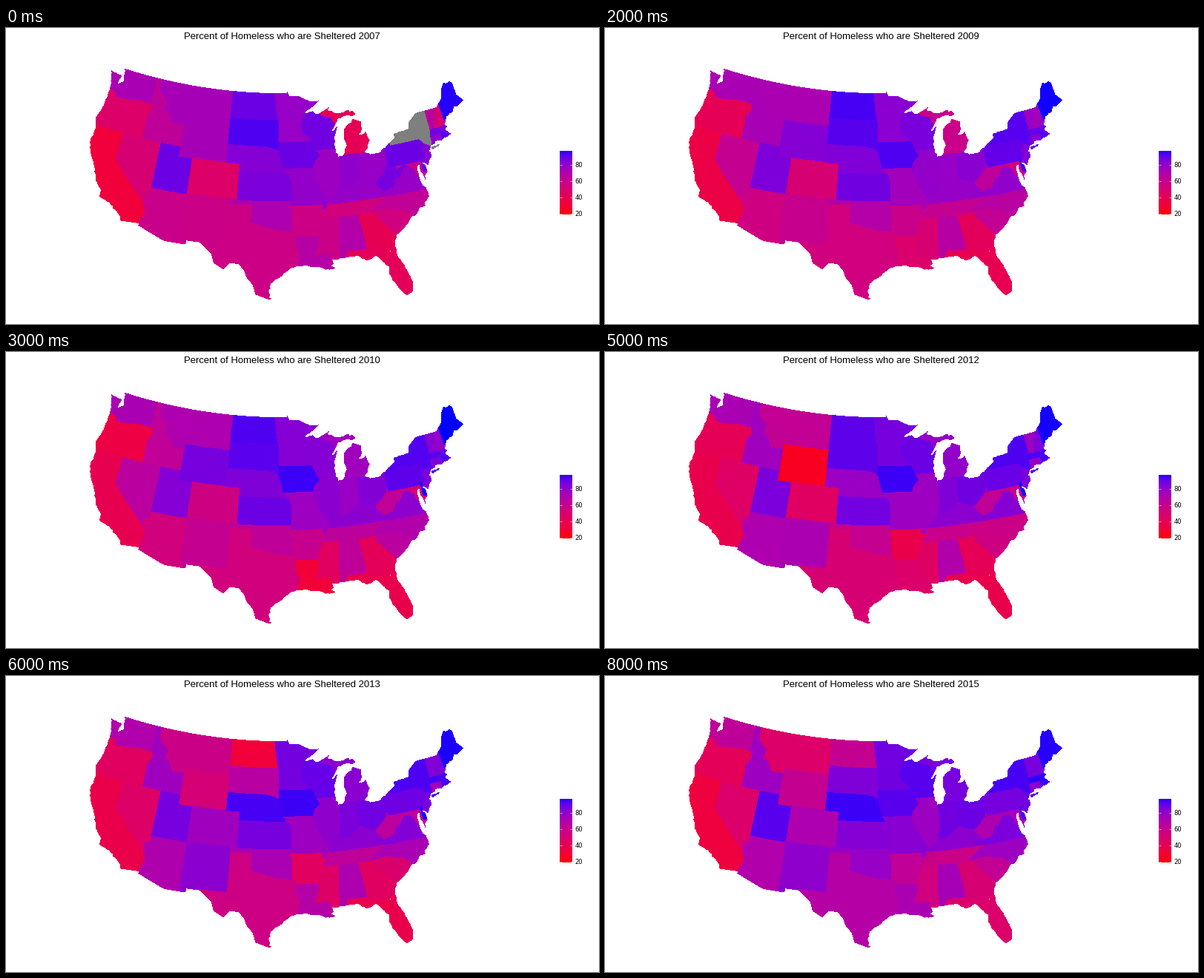
Recreate the animation shown at these times as a matplotlib script. Size 800 by 400 pixels, loop 9 s.

```python
import numpy as np
import matplotlib.pyplot as plt
from matplotlib.animation import FuncAnimation
from matplotlib.patches import PathPatch, Polygon
from matplotlib.path import Path

W, H, DPI = 800, 400, 100
YEARS = range(2007, 2016)
LOW, HIGH = 18.2, 96.5
PT = 72 / DPI

fig = plt.figure(figsize=(W / DPI, H / DPI), dpi=DPI, facecolor="white")
ax = fig.add_axes([0, 0, 1, 1])
ax.axis("off")
rng = np.random.default_rng(4)

# Albers projection with parallels 39 and 45, in pixels
RADIUS, MID_LON, X0, Y49 = 698.8, 95.84, 372.8, 87.7
P1, P2 = np.radians([39, 45])
CONE = (np.sin(P1) + np.sin(P2)) / 2
K = np.cos(P1) ** 2 + 2 * CONE * np.sin(P1)


def rho(lat):
    return RADIUS * np.sqrt(K - 2 * CONE * np.sin(np.radians(lat))) / CONE


def project(west, lat):
    angle = np.radians(MID_LON - west) * CONE
    r = rho(lat)
    return np.column_stack([X0 + r * np.sin(angle),
                            Y49 + r * np.cos(angle) - rho(49)])


def trace(line, rough=0.0):
    """Subdivide a list of west longitudes and latitudes, then project it."""
    pts = np.reshape(line, (-1, 2))
    parts = [pts[:1]]
    for a, b in zip(pts, pts[1:]):
        n = max(1, int(np.abs(b - a).max() * 4))
        parts.append(a + (b - a) * np.arange(1, n + 1)[:, None] / n)
    xy = project(*np.vstack(parts).T)
    return xy + rng.normal(0, 1, xy.shape) * rough


def ramp(t):
    """Red to blue, blended in CIE Lab."""
    lab = np.array([53.24, 80.09, 67.2]) * (1 - t) + np.array([32.3, 79.19, -107.86]) * t
    fy = (lab[0] + 16) / 116
    f = np.array([fy + lab[1] / 500, fy, fy - lab[2] / 200])
    xyz = np.where(f > 6 / 29, f ** 3, (f - 4 / 29) * 108 / 841) * [0.9505, 1, 1.089]
    rgb = np.array([[3.2406, -1.5372, -0.4986],
                    [-0.9689, 1.8758, 0.0415],
                    [0.0557, -0.2040, 1.0570]]) @ xyz
    rgb = np.clip(rgb, 0, 1)
    return np.where(rgb > 0.0031308, 1.055 * rgb ** (1 / 2.4) - 0.055, 12.92 * rgb)


def shade(rate):
    if np.isnan(rate):
        return "#7f7f7f"
    return ramp(np.clip((rate - LOW) / (HIGH - LOW), 0, 1))


shapes = []


def state(first, last, ring, **turns):
    """Rate runs from first to last; y10=62 bends the line in 2010."""
    keys = {2007: first, **{2000 + int(k[1:]): v for k, v in turns.items()}, 2015: last}
    rates = np.interp(YEARS, list(keys), list(keys.values()))
    patch = Polygon(trace(ring + ring[:2]), lw=0, antialiased=False)
    ax.add_patch(patch)
    shapes.append((patch, [shade(r) for r in rates]))


def box(west, east, south, north):
    return [west, north, east, north, east, south, west, south]


# States run loosely past the coast and under later neighbours.
# Northwest: ID, WA, OR, MT
state(63, 76, box(117.25, 111.05, 42, 49), y08=83, y10=62, y12=75)
state(72, 63, box(125, 117.03, 45.5, 49), y12=72)
state(46, 41, [125, 46.25, 123.5, 46.25, 122.8, 46.1, 122.75, 45.65, 121.2, 45.65, 119, 46,
               116.92, 46, 116.5, 45.5, 117.2, 44.4, 117.03, 43.8, 117.03, 42, 125, 42],
      y08=45, y10=34, y13=43)
state(73, 46, [116.05, 49, 104.05, 49, 104.05, 45, 111.05, 45, 111.05, 44.5, 113, 44.45,
               113.95, 45.7, 114.5, 45.56, 114.35, 46.65, 115.7, 47.45, 116.05, 48],
      y10=70, y13=57)
# Southwest: NV, CA, AZ, UT, WY, CO, TX, NM, OK
state(50, 47, box(120, 114.04, 35, 42), y10=65, y12=45)
state(31, 32, [125, 42, 120, 42, 120, 39, 114.63, 35, 114, 34, 114.5, 32, 125, 32],
      y08=31, y10=38, y13=36)
state(58, 69, [114.04, 37, 109.05, 37, 109.05, 31, 115, 31, 114.72, 32.72, 114.14, 34.3,
               114.63, 35, 114.75, 36.1, 114.04, 36.2], y10=53, y12=70)
state(88, 91, box(114.04, 109.05, 37, 42), y10=83, y13=86)
state(73, 60, box(111.05, 104.05, 41, 45), y08=80, y10=86, y12=24, y13=51)
state(46, 70, box(109.05, 102.05, 37, 41), y08=45, y10=55, y12=44, y13=75)
state(56, 67, box(107, 93.5, 25, 36.5), y10=53, y12=50)
state(57, 80, [109.05, 37, 103, 37, 103.05, 32, 106.62, 32, 106.62, 31, 109.05, 31],
      y10=60, y12=71, y13=81)
state(70, 78, [100, 34.56, 98.1, 34.13, 96.5, 33.8, 94.48, 33.64, 94.43, 35.4, 94.62, 37,
               103, 37, 103, 36.5, 100, 36.5], y08=73, y10=63, y12=60, y13=72)
# Plains and upper lakes: MI, MN, IA, ND, SD, AR, MO, NE, KS, WI
state(40, 86, box(90.5, 82, 41.7, 47.6), y08=41, y10=75)
state(78, 87, [97.5, 49, 96, 49.5, 89, 49.5, 89.4, 47.9, 91.8, 46.8, 92.3, 46, 91, 43.5,
               97.5, 43.5], y12=86)
state(88, 91, [97, 43.5, 91.22, 43.5, 90, 42.3, 90, 40.3, 91.42, 40.38, 91.73, 40.6,
               97, 40.6], y10=94, y13=94)
state(88, 60, [104.05, 49, 97.23, 49, 96.8, 46.6, 96.56, 45.94, 104.05, 45.94],
      y08=94, y12=90, y13=31)
state(92, 84, [104.05, 45.94, 96.56, 45.94, 96.45, 45.3, 96.45, 42.49, 97, 42.7,
               104.05, 42.7], y12=90, y13=66)
state(56, 62, [94.62, 36.5, 89.6, 36.5, 89.6, 33.02, 94.04, 33.02, 94.04, 33.55,
               94.48, 33.64, 94.43, 35.4], y10=59, y12=36, y13=43)
state(79, 82, [95.77, 40.58, 91.73, 40.6, 90.5, 40.2, 89.2, 37, 89.4, 36.5, 89.7, 36,
               90.37, 36, 90.15, 36.5, 94.62, 36.5, 94.62, 39.1, 95.5, 40],
      y08=73, y10=76, y13=76)
state(83, 94, [104.05, 43, 98.5, 43, 97, 42.75, 96.45, 42.49, 95.77, 40.58, 95.3, 40,
               102.05, 40, 102.05, 41, 104.05, 41], y10=84, y12=77, y13=93)
state(85, 83, [102.05, 40, 95.3, 40, 94.9, 39.8, 94.62, 39.1, 94.62, 37, 102.05, 37],
      y10=88, y13=86)
state(87, 91, [92.3, 46.1, 92.1, 46.75, 90.8, 47.1, 90.4, 46.57, 88.1, 45.9, 87.65, 45.1,
               86.8, 45.4, 87.5, 42.5, 90.65, 42.5, 91.22, 43.5, 92.75, 44.75, 92.87, 45.6],
      y08=88, y10=83, y12=88)
# South: LA, MS, AL, NC, GA, FL, SC, TN
state(67, 71, [94.04, 33.02, 91, 33.02, 88.5, 31, 88.5, 28.8, 93.85, 28.8, 93.85, 29.7,
               93.7, 30.5, 93.55, 31.1, 94.04, 31.99], y08=64, y10=30, y12=47, y13=67)
state(57, 54, [88, 35, 90.3, 35, 91.15, 33.4, 91, 32.3, 91.6, 31, 89.73, 31, 89.6, 30.1,
               88, 30.1], y08=56, y10=43, y13=45)
state(68, 73, [88.2, 35, 85, 35, 85, 30, 88.4, 30, 88.47, 31.9], y08=70, y10=63, y12=69)
state(62, 76, box(84.32, 75, 33.5, 36.57), y08=62, y10=69, y12=57, y13=72)
state(39, 50, [85.6, 35, 82.5, 35, 80.5, 32, 80.5, 30.5, 85, 30.5, 85.05, 32.1,
               85.18, 32.87], y08=42, y12=40)
state(41, 47, [87.6, 31, 85, 31, 84.86, 30.7, 82.1, 30.4, 82.05, 30.75, 79, 30.75, 79, 25,
               87.5, 25], y10=37, y13=37)
state(54, 61, [83.1, 35, 82.3, 35.2, 81.05, 35.1, 80.8, 34.82, 79.67, 34.8, 78.55, 33.86,
               78.5, 32, 80.9, 32, 81.4, 32.7, 83.35, 34.7], y10=65, y12=55, y13=48)
state(53, 57, [90.3, 35, 89.5, 36.5, 83.68, 36.6, 81.68, 36.59, 82.9, 35.95, 84.32, 35],
      y10=64, y12=58, y13=63)
# Middle: MD, VA, KY, WV, OH, IN, IL
state(60, 72, box(79.48, 75, 37.9, 39.72), y08=60, y10=49, y13=61)
state(78, 85, [83.68, 36.6, 75, 36.55, 75, 37.95, 76.3, 37.95, 77, 38.3, 77.05, 38.8,
               77.8, 39.4, 78.35, 39.4, 82, 37.54])
state(78, 81, [89.4, 36.5, 89.2, 37.2, 88, 39, 82, 39, 82, 37.54, 83.68, 36.6],
      y08=75, y10=81)
state(86, 70, [80.52, 40.63, 80.52, 39.72, 79.48, 39.72, 79.48, 39.2, 78.2, 39.68,
               77.73, 39.32, 78.35, 39.4, 79.3, 38.42, 79.65, 38.58, 80.3, 37.5, 81.68, 37.2,
               82.6, 38.17, 82.6, 38.42, 81.75, 39, 80.85, 39.75], y08=65, y10=62, y12=62)
state(78, 88, [84.82, 41.7, 83.4, 41.73, 83, 42, 80.52, 42.2, 80.52, 40.63, 80.85, 39.75,
               81.75, 39, 82.6, 38.42, 83.7, 38.65, 84.82, 39.1], y12=87)
state(80, 87, [87.53, 41.75, 84.82, 41.75, 84.82, 39.1, 85.4, 38.7, 86.4, 38.05,
               88.05, 37.8, 87.53, 39.35], y10=77, y12=84)
state(76, 76, [90.65, 42.5, 87, 42.5, 87.53, 41.7, 87.53, 39.35, 88.05, 37.8, 89.15, 37,
               89.5, 37.3, 90.7, 39, 91.42, 40.38, 91.05, 41.2, 90.15, 41.9],
      y10=81, y12=76, y13=80)
# Northeast: NY, PA, DE, NJ, VT, ME, NH, MA, CT, RI
state(np.nan, 93, box(79.8, 71.8, 40.5, 45.1), y08=91)
state(88, 86, [80.52, 42.3, 79.76, 42.3, 79.76, 42, 75.35, 42, 74.7, 41.36, 75.1, 40.9,
               74.7, 40.2, 75.42, 39.8, 75.79, 39.72, 80.52, 39.72], y10=90)
state(88, 92, [75.79, 39.85, 75.3, 39.85, 75, 38.46, 75.7, 38.46], y10=96, y13=96)
state(82, 87, [75.42, 39.8, 74.75, 40.2, 75.2, 40.7, 74.7, 41.36, 73.9, 41, 74.03, 40.6,
               73.5, 40, 74.7, 38.7, 75.5, 39.5])
state(65, 85, [73.35, 45.1, 71.5, 45.1, 72.05, 44.1, 72.46, 42.73, 73.27, 42.75, 73.3, 43.6],
      y10=82, y12=76, y13=83)
state(95.5, 95.5, [71.08, 45.3, 71.08, 48, 66, 48, 66, 43, 70.7, 43.07, 70.98, 43.4],
      y10=96.5)
state(50, 86, [71.5, 45, 71.5, 45.4, 71.08, 45.4, 70.98, 43.4, 70.5, 42.87, 71.3, 42.7,
               72.46, 42.7, 72.05, 44.1], y08=70, y10=79, y12=84)
state(87, 95, [73.27, 42.75, 71.3, 42.7, 70.7, 42.9, 69, 42.9, 69, 41, 71.1, 41.4,
               71.38, 42.02, 73.5, 42.05], y08=87, y10=91)
state(81, 80, [73.5, 42.05, 71.8, 42.05, 71.86, 41.2, 73.65, 40.98, 73.5, 41.25],
      y10=84, y13=74)
state(92, 94, [71.8, 42.05, 71.38, 42.05, 71.1, 41.3, 71.86, 41.2])

# National outline, clockwise from the northwest corner
NORTH = [122.76, 49, 95.15, 49, 95.15, 49.38, 94.6, 48.72, 92.95, 48.62, 91.4, 48.07, 89.6, 48]
SUPERIOR = [90.8, 47.3, 92.1, 46.75, 90.8, 46.95, 90.4, 46.57, 89.2, 46.85, 87.8, 47.45,
            88.4, 46.95, 87.35, 46.5, 86.6, 46.45, 85, 46.75, 84.95, 46.48, 84.4, 46.5, 84.1, 46]
MICHIGAN = [84.7, 45.95, 85.5, 46.08, 86.7, 45.7, 87, 45.8, 88, 44.57, 87.05, 45.27, 87.7, 43.8,
            87.9, 43, 87.53, 41.7, 86.82, 41.76, 86.2, 42.8, 86.5, 43.7, 86.2, 44.7,
            85.1, 45.35, 84.85, 45.75]
HURON_ERIE = [83.4, 45.2, 83.4, 44.3, 83.9, 43.7, 82.95, 44.07, 82.45, 43, 83.1, 42.2,
              83.45, 41.73, 82.7, 41.5, 81.7, 41.5, 80.5, 42, 78.9, 42.85, 79.05, 43.27,
              76.5, 43.5, 76.3, 44.1, 75, 44.95]
NORTHEAST = [74.7, 45, 71.5, 45, 71.1, 45.3, 70.4, 45.75, 70, 46.7, 69.22, 47.45, 68.9, 47.2,
             68.3, 47.35, 67.79, 47.07, 67.79, 45.7, 66.97, 44.8]
ATLANTIC = [68.2, 44.3, 68.8, 44.4, 69.1, 43.98, 70.25, 43.6, 70.85, 42.87, 70.6, 42.65,
            71, 42.3, 70.5, 41.78, 70, 41.8, 70.2, 42.07, 69.95, 41.7, 70.65, 41.55,
            71.4, 41.45, 72.9, 41.25, 73.9, 40.85, 74.2, 40.5, 74, 40.4, 74.1, 39.75,
            74.9, 38.95, 75.5, 39.5, 75.1, 38.8, 75.1, 38.4, 75.95, 37.15, 75.85, 37.95,
            76.2, 38.5, 76.1, 39.4, 76.45, 39.1, 76.4, 38.1, 76.3, 37, 75.95, 36.9,
            75.65, 35.6, 76.5, 35.1, 76.5, 34.7, 77.3, 34.5, 77.9, 33.9, 78.6, 33.86,
            79.2, 33.2, 80.9, 32.03, 81.4, 31.2, 81.3, 29.9, 80.55, 28.4, 80.03, 26.8,
            80.2, 25.5, 81.1, 25.13]
GULF = [81.8, 26, 82.8, 27.9, 82.65, 28.7, 84, 30.1, 85.3, 29.68, 86.4, 30.38, 88, 30.25,
        89.5, 30.2, 89.3, 29.8, 89.6, 29.55, 89.05, 29.15, 90.2, 29.1, 91.3, 29.5, 93.8, 29.7,
        94.8, 29.4, 95.9, 28.6, 97.2, 27.7, 97.35, 26.9, 97.15, 25.96]
SOUTH = [97.4, 25.84, 99.1, 26.4, 99.5, 27.5, 100.3, 28.3, 100.65, 29.1, 101.4, 29.77,
         102.4, 29.8, 103.15, 28.98, 104.5, 29.65, 104.9, 30.6, 106.5, 31.78, 108.2, 31.78,
         108.2, 31.33, 111.07, 31.33, 114.81, 32.5, 114.72, 32.72, 117.12, 32.53]
PACIFIC = [117.3, 33, 118.4, 33.75, 119.2, 34.15, 120.6, 34.5, 120.65, 35.15, 121.9, 36.4,
           122.5, 37.6, 123.7, 38.9, 124.4, 40.4, 124.1, 41, 124.2, 42, 124.55, 42.84,
           124.1, 44.3, 123.95, 46.2, 124.1, 46.9, 124.7, 48.38, 122.7, 48.14, 122.9, 47.15,
           122.3, 47.6, 122.5, 48.7]
LONG_ISLAND = [74, 40.6, 73.7, 40.9, 71.9, 41.07, 72.5, 40.82, 73.5, 40.58]

SHORE = 0.5  # raggedness in pixels
land = np.vstack([trace(NORTH), trace(SUPERIOR, SHORE), trace(MICHIGAN, SHORE),
                  trace(HURON_ERIE, SHORE), trace(NORTHEAST), trace(ATLANTIC, SHORE),
                  trace(GULF, SHORE), trace(SOUTH), trace(PACIFIC, SHORE)])


def loop(xy):
    return Path(np.vstack([xy, xy[:1]]), closed=True)


# White water with land-shaped holes hides the loose edges.
sea = np.array([[0, 0], [0, H], [W, H], [W, 0]])
water = Path.make_compound_path(loop(sea), loop(land), loop(trace(LONG_ISLAND, SHORE)))
ax.add_patch(PathPatch(water, fc="white", lw=0, antialiased=False, zorder=2))

# Colour bar
LEFT, RIGHT, TOP, BOTTOM = 747, 764, 166, 252
steps = 1 - (np.arange(BOTTOM - TOP) + 0.5) / (BOTTOM - TOP)
bar = np.array([[ramp(t)] for t in np.clip(steps, 0.025, 0.975)])
ax.imshow(bar, extent=(LEFT, RIGHT, BOTTOM, TOP), aspect="auto",
          interpolation="nearest", zorder=3)
for i, rate in enumerate([80, 60, 40, 20]):
    y = 184.5 + 22 * i
    for a, b in [(LEFT, LEFT + 3.4), (RIGHT - 3.4, RIGHT)]:
        ax.plot([a, b], [y, y], color="white", lw=0.4, solid_capstyle="butt", zorder=4)
    ax.text(767.5, y + 3, str(rate), family="DejaVu Sans", size=8.4 * PT)

title = ax.text(240.5, 15, "", family="Liberation Sans", size=13.1 * PT)
ax.set_xlim(0, W)
ax.set_ylim(H, 0)


def draw(i):
    for patch, colors in shapes:
        patch.set_facecolor(colors[i])
    title.set_text(f"Percent of Homeless who are Sheltered {YEARS[i]}")
    return [title]


anim = FuncAnimation(fig, draw, frames=len(YEARS), interval=1000, repeat=True)
plt.show()
```
